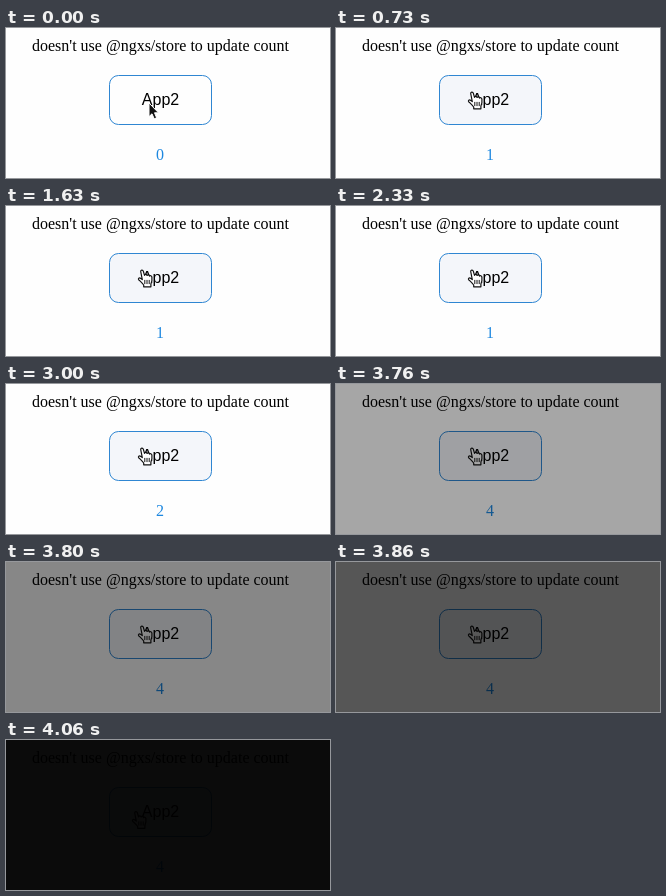
These frames come from a looping animation (324 px wide and 150 px high, 4200 ms). An HTML page:

```html
<!DOCTYPE html>
<html lang="en">
<head>
<meta charset="utf-8">
<style>
  html, body { margin: 0; width: 100%; height: 100%; overflow: hidden; background: #fefefe; }
  svg { display: block; width: 100%; height: 100%; }
  text { font: 16px "Liberation Serif", Times, serif; text-anchor: middle; }
  .label { font-family: "Liberation Sans", Arial, sans-serif; }
</style>
</head>
<body>
<svg viewBox="0 0 324 150">
  <rect width="324" height="150" fill="#fefefe"/>
  <text x="154.5" y="23">doesn't use @ngxs/store to update count</text>
  <rect id="button" x="103.5" y="47.5" width="102" height="49" rx="9" stroke="#2f86d2"/>
  <text class="label" x="154.5" y="77">App2</text>
  <text id="count" x="154" y="131.5" fill="#1e88e0">0</text>

  <!-- Both pointers have their hotspot at the origin -->
  <path id="arrow" d="M0 0V13.6L3 10.8 5.2 15.8 7.6 14.8 5.5 9.8H9.5Z"
        fill="#111" stroke="#fff" stroke-width="1" stroke-linejoin="round"/>
  <g id="hand" stroke="#111" stroke-linejoin="round" stroke-linecap="round">
    <path fill="#fff" stroke-width="1.2" d="M-1.8 1.5C-2-.2.3-.5.8 1.2L2 5.3C2.4 4 4.3 4.2 4.6 5.5
      4.9 4.5 6.8 4.7 7.1 6.1 7.6 5.3 9.2 5.7 9.4 7.2 9.7 9.5 9.5 11.6 8.4 14V16.8H1.2V15
      C-.2 13.2-1.9 11.6-3.7 9.8-4.7 8.6-3.3 7.3-2 8.2L-.2 9.6Z"/>
    <path fill="none" stroke-width="1" d="M2.3 10.3V13.7M4.5 10.3V13.7M6.7 10.3V13.7"/>
  </g>
  <rect id="shade" width="324" height="150"/>
</svg>
<script>
  const LOOP = 4200;
  const COUNT_TIMES = [730, 2400, 3130, 3730];
  const FADE = [[3640, 0], [3700, .125], [3760, .345], [3860, .655], [3960, .87], [4060, .958]];
  const HAND_X = [[30, 143], [300, 136.5], [3860, 136.5], [4060, 130.5]];
  const HAND_Y = [[30, 75], [300, 64], [3860, 64], [4060, 71.5]];
  const HOVER = [[30, 0], [230, 1]];

  const el = id => document.getElementById(id);
  const [button, count, arrow, hand, shade] =
    ["button", "count", "arrow", "hand", "shade"].map(el);

  // Linear interpolation through [time, value] stops, held at both ends.
  function track(stops, t) {
    const next = stops.findIndex(stop => stop[0] > t);
    if (next === 0) return stops[0][1];
    if (next < 0) return stops[stops.length - 1][1];
    const [t0, v0] = stops[next - 1];
    const [t1, v1] = stops[next];
    return v0 + (v1 - v0) * (t - t0) / (t1 - t0);
  }

  function draw(t) {
    const hover = track(HOVER, t);
    button.setAttribute("fill", `rgb(${254 - 10 * hover},${254 - 8 * hover},${254 - 4 * hover})`);
    count.textContent = COUNT_TIMES.filter(time => t >= time).length;

    const overButton = t >= 30;
    const place = `translate(${track(HAND_X, t)} ${track(HAND_Y, t)})`;
    arrow.setAttribute("transform", place);
    hand.setAttribute("transform", place);
    arrow.setAttribute("visibility", overButton ? "hidden" : "visible");
    hand.setAttribute("visibility", overButton ? "visible" : "hidden");
    shade.setAttribute("opacity", track(FADE, t));
  }

  const start = performance.now();
  function tick() {
    draw((performance.now() - start) % LOOP);
    requestAnimationFrame(tick);
  }
  tick();
</script>
</body>
</html>
```
